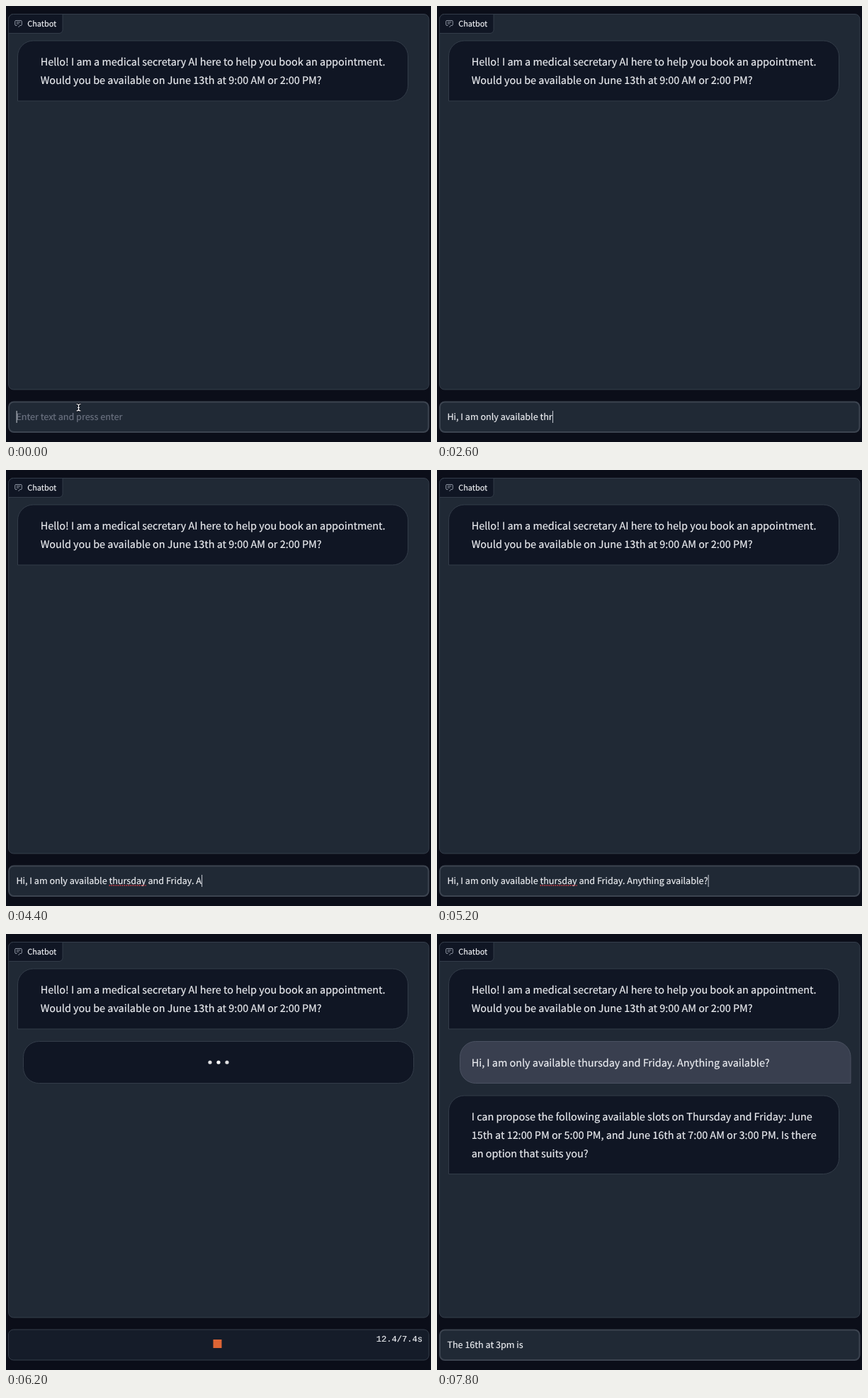
Recreate the animation shown at these times as an HTML page. Size 600x615 px, loop 8000 ms.

```html
<!DOCTYPE html>
<html lang="en">
<head>
<meta charset="utf-8">
<title>Appointment chatbot</title>
<style>
  html, body { margin: 0; width: 100%; height: 100%; overflow: hidden; background: #0b0e19; }
  svg { display: block; width: 100%; height: 100%; }
  text {
    font-family: "Noto Sans CJK SC", "Noto Sans CJK JP", "Noto Sans CJK KR", "Noto Sans CJK TC", "Noto Sans CJK", "Source Sans 3", "Noto Sans", sans-serif;
    text-rendering: geometricPrecision;
    white-space: pre;
    fill: #eceef2;
    stroke: #eceef2;
    stroke-width: .18px;
  }
  .msg { font-size: 14.42px; }
  .field { font-size: 12.6px; }
  .label { font-size: 10.9px; }
  #hint { fill: #6b7280; stroke: #6b7280; }
  #timer { font: 12.1px "Liberation Mono", monospace; text-anchor: end; }
  .panel { fill: #202935; stroke: #353e4b; }
  .bot { fill: #101624; stroke: #333c49; }
  .user { fill: #393f4f; stroke: #4a5161; }
  .line { fill: none; stroke: #8d94a2; }
</style>
</head>
<body>
<svg viewBox="0 0 600 615">
  <rect class="panel" x="3.5" y="11.5" width="593.5" height="529.5" rx="7"/>
  <path class="bot" d="M3.5 38.5V18.5a7 7 0 0 1 7-7H80V33.5a5 5 0 0 1-5 5Z"/>
  <path class="line" d="M15.5 27.5h-1.5a1.3 1.3 0 0 1-1.3-1.3v-4.4a1.3 1.3 0 0 1 1.3-1.3h7a1.3 1.3 0 0 1 1.3 1.3v4.4a1.3 1.3 0 0 1-1.3 1.3h-1.5l-2 2.5M14.8 22.8h5.4M14.8 25h3.6"/>
  <text class="label" x="30.3" y="28.5">Chatbot</text>

  <path class="bot" d="M16.5 134V71a22 22 0 0 1 22-22H545.5a22 22 0 0 1 22 22V112a22 22 0 0 1-22 22Z"/>
  <text class="msg" x="48.7" y="84">Hello! I am a medical secretary AI here to help you book an appointment.</text>
  <text class="msg" x="48.7" y="110.2">Would you be available on June 13th at 9:00 AM or 2:00 PM?</text>

  <g id="pending">
    <rect class="bot" x="24.5" y="151.5" width="551" height="59" rx="22"/>
    <g id="dots" fill="#fff">
      <circle cx="288" cy="181" r="2.6"/>
      <circle cx="300" cy="181" r="2.6"/>
      <circle cx="312" cy="181" r="2.6"/>
    </g>
    <rect class="panel" x="3.5" y="558" width="593.5" height="43" rx="7"/>
    <clipPath id="inside"><rect x="4" y="558.5" width="592.5" height="42" rx="6.5"/></clipPath>
    <rect id="progress" x="4" y="558.5" height="42" fill="#151c29" clip-path="url(#inside)"/>
    <rect x="292.5" y="572" width="12" height="12" fill="#dd6535"/>
    <text id="timer" x="588" y="575"></text>
  </g>

  <g id="reply">
    <path class="user" d="M584 210.5H54.5a22 22 0 0 1-22-22V173.500a22 22 0 0 1 22-22H562a22 22 0 0 1 22 22Z"/>
    <text class="msg" x="48.7" y="186.500">Hi, I am only available thursday and Friday. Anything available?</text>
    <path class="bot" d="M16.5 338.500V250a22 22 0 0 1 22-22H545.500a22 22 0 0 1 22 22V316.500a22 22 0 0 1-22 22Z"/>
    <text class="msg" x="48.7" y="262.800">I can propose the following available slots on Thursday and Friday: June</text>
    <text class="msg" x="48.7" y="289">15th at 12:00 PM or 5:00 PM, and June 16th at 7:00 AM or 3:00 PM. Is there</text>
    <text class="msg" x="48.7" y="315.200">an option that suits you?</text>
  </g>

  <g id="entry">
    <rect class="panel" x="4" y="558.5" width="592.500" height="42.500" rx="7" style="stroke:#3c4450;stroke-width:2"/>
    <text id="hint" class="field" x="14.4" y="584">Enter text and press enter</text>
    <text id="typed" class="field" x="14.4" y="584"></text>
    <path id="squiggle" fill="none" stroke="#d43a44" stroke-width="1.7" stroke-dasharray="1.7 1.3"/>
    <rect id="caret" y="571" width="1" height="17" fill="#c9cdd5"/>
  </g>
  <g id="pointer" fill="none">
    <path id="beam" d="M99.500 561.500q3 0 3 2v5.500q0 2-3 2M105.500 561.500q-3 0-3 2v5.500q0 2 3 2M101 566.500h3" stroke="#0b0e19" stroke-width="2.800"/>
    <use href="#beam" style="stroke:#fff"/>
    <path d="M99.500 561.500q3 0 3 2v5.500q0 2-3 2M105.500 561.500q-3 0-3 2v5.500q0 2 3 2M101 566.500h3" stroke="#fff" stroke-width="1.200"/>
  </g>
</svg>
<script>
const $ = id => document.getElementById(id);
const show = (id, on) => { $(id).style.display = on ? "" : "none"; };

const LOOP = 8000, STEP = 200;
const SEND = 27, ANSWER = 32, TYPO = 13, LAST = 39;
const LEFT = 14.4;
const request = "Hi, I am only available thursday and Friday. Anything available?";
const choice = "The 16th at 3pm is";
const wordStart = request.indexOf("thursday"), wordEnd = wordStart + 8;

// Characters typed at each step
const requestLengths = [0, 0, 1, 2, 4, 5, 8, 10, 13, 15, 17, 20, 23, 27, 26, 28, 29, 31, 32, 34, 38, 42, 46, 51, 56, 61, 64];
const choiceLengths = [0, 3, 5, 8, 11, 13, 15, 18];

function textAt(step) {
  if (step >= ANSWER) return choice.slice(0, choiceLengths[step - ANSWER]);
  if (step === TYPO) return request.slice(0, wordStart) + "thr";
  return request.slice(0, requestLengths[step]);
}

function drawEntry(step) {
  const value = textAt(step), typed = $("typed");
  typed.textContent = value;
  show("hint", !value);
  show("caret", step !== LAST);
  const width = value ? typed.getComputedTextLength() : 0;
  $("caret").setAttribute("x", LEFT + width + .2);

  const misspelt = step < SEND && value.length > wordEnd;
  show("squiggle", misspelt);
  if (misspelt) {
    const from = LEFT + typed.getSubStringLength(0, wordStart);
    const to = LEFT + typed.getSubStringLength(0, wordEnd);
    $("squiggle").setAttribute("d", `M${from} 586H${to}`);
  }
}

function drawPending(tick) {
  const seconds = .3 + 3.025 * tick;
  $("timer").textContent = seconds.toFixed(1) + "/7.4s";
  $("progress").setAttribute("width", 592.5 * Math.min(1, seconds / 7.4));
  [...$("dots").children].forEach((dot, i) => {
    dot.setAttribute("opacity", .8 + .2 * Math.cos(2.4 + 1.27 * tick - 1.2 * i));
  });
}

let shown = -1;
function render(now) {
  const step = Math.floor(now % LOOP / STEP);
  if (step !== shown) {
    shown = step;
    const waiting = step >= SEND && step < ANSWER;
    show("pending", waiting);
    show("entry", !waiting);
    show("reply", step >= ANSWER);
    show("pointer", step < 2);
    if (waiting) drawPending(step - SEND);
    else drawEntry(step);
  }
  requestAnimationFrame(render);
}
render(performance.now());
</script>
</body>
</html>
```
